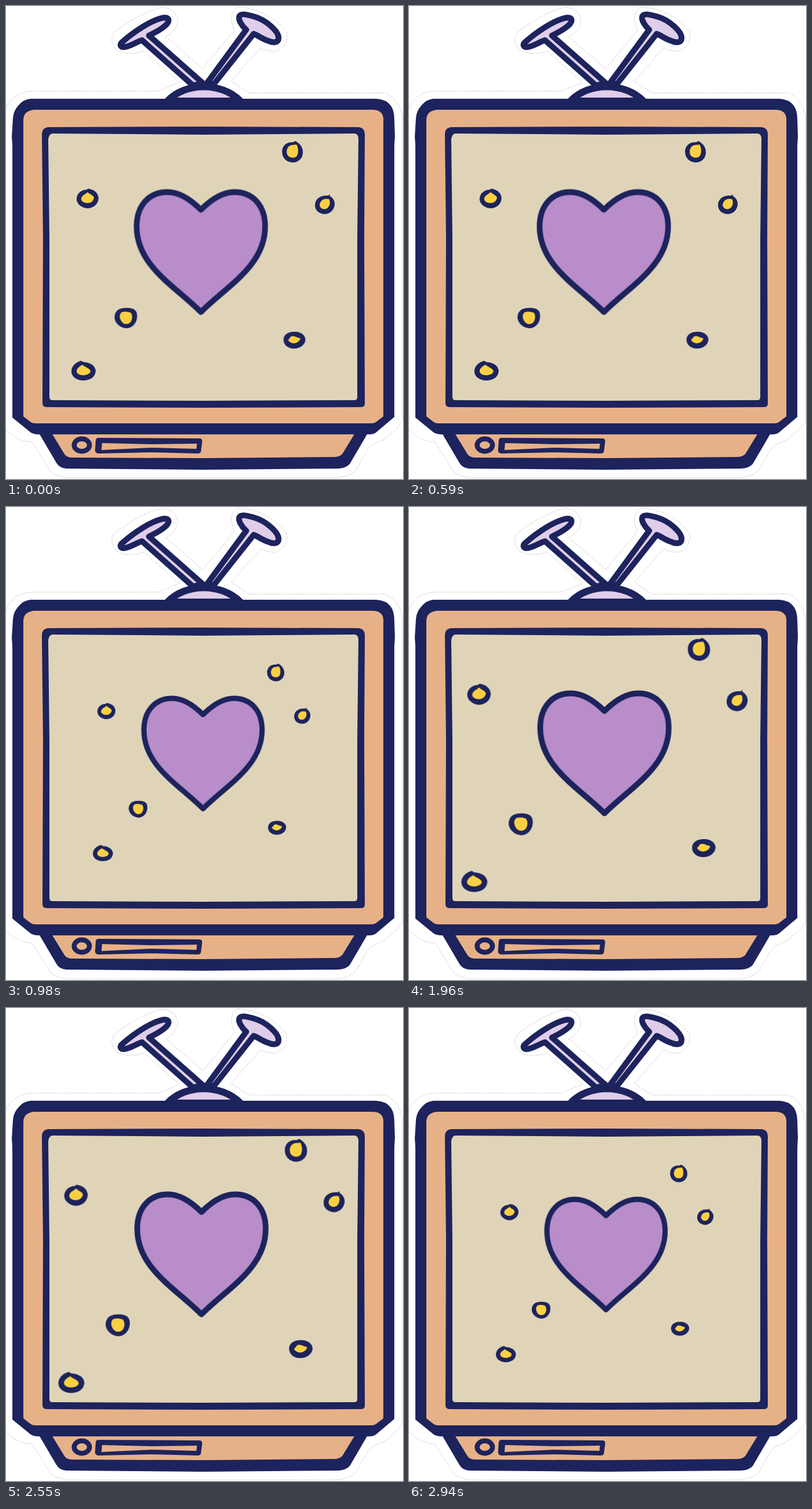
Animation of 686x816 px, one loop 3.92 s. Source, as an HTML page:

```html
<!DOCTYPE html>
<html lang="en">
<head>
<meta charset="utf-8">
<title>Heart television</title>
<style>
  html, body { margin: 0; width: 100%; height: 100%; overflow: hidden; background: #fff; }
  svg { display: block; width: 686px; height: 816px; }
  .navy { fill: #1d235d; }
  .wood { fill: #e7b187; }
  .screen { fill: #dfd4b8; }
  .yellow { fill: #fad043; }
  .antenna { fill: #dfcde9; stroke: #1d235d; stroke-width: 10; stroke-linejoin: round; }
  .heart { fill: #b88dc9; stroke: #1d235d; stroke-width: 9.8; stroke-linejoin: round; }
  .cut { fill: none; stroke: #c4c4c4; stroke-width: .7; stroke-dasharray: 5 1; }
</style>
</head>
<body>
<svg viewBox="0 0 686 816">
  <path class="cut" d="M0 178Q8 151 42 147H262L300 132L239 78Q207 87 190 75Q177 59 188 45Q230 12 270 2Q296 5 297 28Q292 45 276 53L340 108L395 42Q382 14 400 2Q452 4 485 45Q488 70 465 78Q450 78 440 72L389 130L420 150H655Q684 163 685.5 200V715Q676 732 650 750Q632 755 625 765L605 800Q595 812 570 814H105Q80 810 75 800L45 752Q20 752 0 730"/>

  <path class="antenna" d="M323 137L235 59C225 62 213 71 203 71C196 71 197 65 201 62C218 47 251 23 274 20C283 20 283 27 275 34C266 42 255 47 247 51L340 133Z"/>
  <path class="antenna" d="M348 132L415 41C407 34 401 23 403 18C406 12 418 15 428 18C450 24 471 44 471 55C471 64 461 64 453 60C443 57 436 51 428 48L359 135Z"/>
  <path class="antenna" style="stroke-width:12" d="M279 164C310 131 373 131 405 164Z"/>

  <path class="navy" d="M57 737L87 788Q92 797 104 798L340 800L574 798Q588 797 594 790L625 737Z"/>
  <path class="wood" d="M79 737L101 773Q105 779 115 779L340 780L567 778Q576 778 581 773L603 737Z"/>
  <path class="navy" d="M42 160H640Q657 161 665 172Q671 181 671 195L672 225L671 240V709L639 736Q635 739 628 739H54Q48 739 43 736L11 710V240L10 225L12 193Q13 181 21 172Q30 161 42 160Z"/>
  <path class="wood" d="M48 179H634Q644 179 649 185Q653 191 652 200V708L639 718Q636 720 631 720H51Q46 720 43 718L30 708V197Q30 181 48 179Z"/>
  <path class="navy" d="M73 209L340 208L609 209Q620 210 620 222L619 400L620 686Q620 692 613 692L340 693L70 692Q63 692 63 685L64 400L62 222Q62 210 73 209Z"/>
  <path class="screen" d="M80 220L340 222L602 220Q609 220 609 230L607 400V675Q607 680 602 680L340 681L80 680Q75 680 75 674V400L73 230Q74 221 80 220Z"/>

  <ellipse class="navy" cx="131" cy="757.5" rx="17.5" ry="15"/>
  <ellipse class="wood" cx="131" cy="757.5" rx="9" ry="6.5"/>
  <path class="navy" d="M160 745L334 746Q339 746 339 751L337 767Q337 772 331 772L250 770L160 772Q153 771 154 765L155 750Q155 745 160 745Z"/>
  <path class="wood" d="M166 754L250 756L330 755L329 764L250 762L165 766Z"/>

  <g id="art"></g>
</svg>
<script>
const LOOP = 3920;
const art = document.getElementById('art');

// rim and yolk outlines around each dot's middle, with its place in each pose
const dots = [
  { rim: 'M7 -17Q18 -10 18 1C18 13 9 19 0 19C-11 18 -18 11 -18 0C-18 -10 -10 -17 1 -16L5 -18Z',
    yolk: 'M-2 -11L7 -12C10 -7 11 1 8 7C5 12 -4 12 -8 7C-12 1 -10 -9 -2 -11Z',
    at: [[495, 251], [466, 285], [501, 245]] },
  { rim: 'M1 -17Q18 -14 19 0C18 11 9 17 -1 17C-11 16 -19 9 -19 1C-19 -9 -10 -15 -2 -15Z',
    yolk: 'M0 -11C4 -7 11 -5 11 -1C10 5 5 8 0 8C-6 8 -11 5 -11 1C-11 -5 -4 -7 0 -11Z',
    at: [[141, 332], [173.5, 352], [121, 323]] },
  { rim: 'M8 -17L9 -14Q17 -9 17 0C16 11 8 17 -1 17C-11 16 -17 10 -17 2C-17 -9 -9 -16 6 -15Z',
    yolk: 'M7 -9C10 -4 9 3 4 7C-1 10 -8 8 -9 2C-9 -5 -3 -10 4 -9Z',
    at: [[551, 342], [512, 360], [567, 334]] },
  { rim: 'M-12 -15Q-2 -19 11 -16Q20 -13 19 -1C18 11 9 18 0 18C-11 17 -19 9 -20 0Q-20 -11 -12 -15Z',
    yolk: 'M-7 -10Q0 -12 8 -9C12 -4 11 5 6 9C1 12 -5 11 -8 6C-12 0 -12 -7 -7 -10Z',
    at: [[207.5, 538], [228.5, 521], [193.5, 547]] },
  { rim: 'M-1 -14C11 -15 19 -8 19 0C18 9 9 15 -1 15C-12 15 -19 8 -19 0C-19 -9 -11 -14 -1 -14Z',
    yolk: 'M-6 -6C0 -8 3 -4 10 -3C10 2 4 6 -2 6C-7 5 -10 3 -11 0Q-8 -3 -6 -6Z',
    at: [[498.5, 576], [468.5, 553], [509.5, 588]] },
  { rim: 'M-4 -17L-1 -15Q20 -13 21 1C20 12 10 17 0 17C-11 17 -21 11 -21 1C-21 -8 -13 -15 -4 -17Z',
    yolk: 'M-2 -10C3 -6 11 -4 12 1C11 6 5 8 -1 8C-7 8 -12 5 -12 1C-12 -4 -6 -8 -2 -10Z',
    at: [[134, 629], [167.5, 597], [113, 646]] }
];
const dotSizes = [1, .826, 1.07];

const heart = 'M0 -73C-19 -92 -38 -103.5 -58 -103.5C-90 -103.5 -111 -80 -111 -44C-111 24 -44 59 0 103.5' +
              'C44 59 111 24 111 -44C111 -80 90 -103.5 58 -103.5C38 -103.5 19 -92 0 -73Z';

function path(parent, cls, d) {
  const p = document.createElementNS('http://www.w3.org/2000/svg', 'path');
  p.setAttribute('class', cls);
  p.setAttribute('d', d);
  parent.append(p);
}

// each pose holds for a quarter of the loop: wide, small, widest, small
function pulse(places, sizes, layers) {
  const g = document.createElementNS('http://www.w3.org/2000/svg', 'g');
  layers.forEach(([cls, d]) => path(g, cls, d));
  art.append(g);
  const steps = [0, 1, 2, 1, 1].map((pose, i) => {
    const [x, y] = places[pose];
    return {
      offset: i / 4,
      easing: 'step-end',
      transform: `translate(${x}px, ${y}px) scale(${sizes[pose]})`
    };
  });
  g.animate(steps, { duration: LOOP, iterations: Infinity }).startTime = 0;
}

pulse([[336.7, 424.5], [340.4, 425.3], [337.7, 425]], [1, .92, 1], [['heart', heart]]);
dots.forEach(d => pulse(d.at, dotSizes, [['navy', d.rim], ['yellow', d.yolk]]));
</script>
</body>
</html>
```
